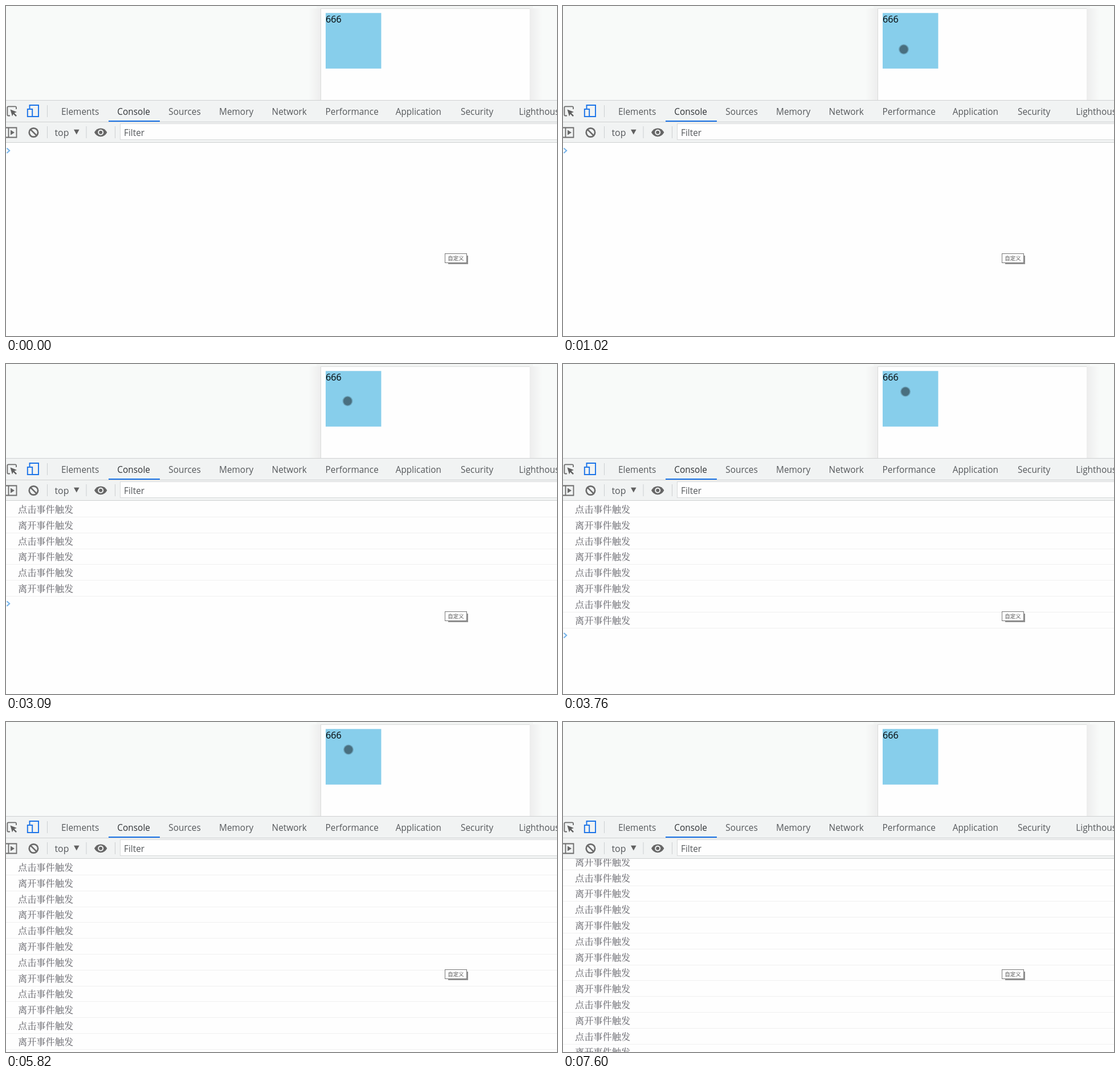
An HTML page for the animation above (8 s loop, 967x579 px).

```html
<!DOCTYPE html>
<html lang="zh">
<head>
<meta charset="utf-8">
<title>Console event log</title>
<style>
  html, body { margin: 0; width: 100%; height: 100%; overflow: hidden; background: #fefefe; }
  svg { display: block; width: 967px; height: 579px; }
  text { font: 15.4px "Open Sans", "Noto Sans", sans-serif; fill: #55585b; }
  .log text { font: 16.2px "Noto Serif CJK SC", "Noto Sans CJK SC", "Noto Sans CJK", serif; fill: #5a5a61; }
  .log path { stroke: #f0f0f0; shape-rendering: crispEdges; }
  .tip text { font: 9.5px "Noto Sans CJK SC", "Noto Sans CJK", sans-serif; fill: #555; }
  .line { fill: none; stroke: #6b6b6b; stroke-width: 1.8; }
  .sep { stroke: #cccfd1; }
</style>
</head>
<body>
<svg viewBox="0 0 967 579">
  <defs>
    <linearGradient id="shade">
      <stop offset="0" stop-color="#ededed"/>
      <stop offset="1" stop-color="#f8faf9"/>
    </linearGradient>
    <clipPath id="pane"><path d="M0 240H967V579H0Z"/></clipPath>
  </defs>

  <!-- page preview -->
  <rect width="967" height="166" fill="#f8faf9"/>
  <rect id="side" x="919" y="4" width="22" height="162" fill="url(#shade)"/>
  <use href="#side" transform="matrix(-1 0 0 1 1472 0)"/>
  <rect x="545" width="380" height="4" fill="#f3f5f4"/>
  <rect x="553" y="4" width="366" height="162" fill="#fefefe"/>
  <path d="M552.5 166V4.5H919" fill="none" stroke="#d9dbda"/>
  <rect x="561" y="12.3" width="97.5" height="97.5" fill="#87ceeb"/>
  <text x="561" y="28.8" style="font-size:16.2px;fill:#000">666</text>

  <!-- tab bar and toolbar -->
  <rect y="166" width="967" height="74" fill="#f1f3f3"/>
  <path d="M0 165.5H967M0 203.5H967M0 239.5H967" stroke="#cfd1d2"/>
  <g id="tabs"></g>
  <rect x="180" y="201" width="90" height="2" fill="#1a73e8"/>
  <path class="sep" d="M72.5 174V195M72.5 211V232M141 211V232M191.5 211V232"/>

  <path class="line" d="M7 192.5H4Q2.4 192.5 2.4 191V178Q2.4 176.4 4 176.4H16.5Q18 176.4 18 178V181"/>
  <path d="M7.5 181.5L19 186L14.5 187.8L19 192.2L17.2 194L12.8 189.5L11 193.5Z" fill="#5f5f5f"/>
  <path d="M41.5 180V174H57V194H47" fill="none" stroke="#1a73e8" stroke-width="1.9"/>
  <rect x="37.8" y="181" width="8.4" height="13" fill="none" stroke="#1a73e8" stroke-width="1.9"/>

  <path class="line" d="M-1 213.5H18.5V230.5H-1M4.5 213V231"/>
  <path d="M8 217.5L15 222L8 226.5Z" fill="#6b6b6b"/>
  <g class="line" style="stroke-width:2.7"><circle cx="48.4" cy="222" r="7.7"/><path d="M43 216.6L53.8 227.4"/></g>
  <text x="85.5" y="228" style="font-size:15.9px">top</text>
  <path d="M119 216.8H128.6L123.8 225.6Z" fill="#616161"/>
  <path d="M155 221.8Q159 214.4 166.2 214.4T177.4 221.8Q173.5 229.2 166.2 229.2T155 221.8Z" fill="#666"/>
  <circle cx="166.2" cy="221.8" r="4" fill="#666" stroke="#f1f3f3" stroke-width="2"/>
  <rect x="200.5" y="206.5" width="780" height="28" fill="#fefefe" stroke="#d7d9da"/>
  <text x="207" y="228.3">Filter</text>

  <!-- console -->
  <rect y="240" width="967" height="339" fill="#fefefe"/>
  <g clip-path="url(#pane)">
    <g id="scroller">
      <g class="log" id="log"></g>
      <path id="prompt" d="M1.5 249.5L6.2 253.7L1.5 258" fill="none" stroke="#71b1ea" stroke-width="2"/>
    </g>
  </g>

  <g class="tip">
    <path d="M776 452H810V438" fill="none" stroke="#949494" stroke-width="2"/>
    <rect x="770.5" y="434.5" width="38" height="16" fill="#fefefe" stroke="#777"/>
    <text x="775.3" y="446">自定义</text>
  </g>

  <path id="arrow" d="M.7 .7V16.5L4.3 13.1L7 19.2L9.7 18L7.1 12.1H12Z" fill="#fff" stroke="#222"/>
  <g id="touch">
    <circle r="9" fill-opacity=".2"/>
    <circle r="7.4" fill-opacity=".32"/>
  </g>
</svg>
<script>
const LOOP = 8000, ROW = 27.8, FIT = 12.68;
const $ = id => document.getElementById(id);
const NS = 'http://www.w3.org/2000/svg';

function add(parent, tag, attrs, label = '') {
  const el = document.createElementNS(NS, tag);
  for (const key in attrs) el.setAttribute(key, attrs[key]);
  el.textContent = label;
  return parent.appendChild(el);
}

const tabs = { Elements: 97, Console: 195.3, Sources: 285.3, Memory: 374, Network: 466.6,
  Performance: 560.5, Application: 683.7, Security: 798, Lighthouse: 900.3 };
for (const name in tabs) {
  const tab = add($('tabs'), 'text', { x: tabs[name], y: 190.7 }, name);
  if (name === 'Console') tab.style.fill = '#303336';
}

// moment at which each message is logged
const logTimes = [1280, 1280, 1350, 1420, 2480, 2550, 3630, 3690, 4750, 4820, 5750, 5820, 6740, 6810];
const rows = logTimes.map((_, i) => {
  const row = add($('log'), 'g', { transform: `translate(0 ${Math.round(i * ROW)})` });
  add(row, 'text', { x: 21, y: 260.5 }, (i % 2 ? '离开' : '点击') + '事件触发');
  add(row, 'path', { d: 'M0 268.5H967' });
  return row;
});

// pointer poses: time, x, y, shape
const poses = [
  [0],
  [200, 934, 565, 'arrow'], [270, 914, 524, 'arrow'], [340, 868, 420, 'arrow'],
  [410, 815, 305, 'arrow'], [480, 760, 205, 'arrow'], [550, 705, 128, 'touch'],
  [620, 662, 91.5, 'touch'], [690, 643, 87, 'touch'], [750, 628, 84.5, 'touch'],
  [820, 615, 82.5, 'touch'], [890, 606, 81.5, 'touch'], [950, 601, 81, 'touch'],
  [1020, 598, 76, 'touch'], [1080, 595.5, 71.3, 'touch'],
  [3090, 599.5, 65, 'touch'], [3160, 600.5, 59, 'touch'], [3230, 601, 54, 'touch'],
  [3300, 601, 50.5, 'touch'], [3370, 601, 48.5, 'touch'],
  [7270],
  [7480, 714, 308, 'arrow'], [7540, 837, 519, 'arrow'],
  [7600]
];

function draw(now) {
  const t = now % LOOP;
  const count = logTimes.filter(at => at <= t).length;
  rows.forEach((row, i) => row.style.display = i < count ? '' : 'none');
  $('prompt').setAttribute('transform', `translate(0 ${count * ROW})`);
  // the view stays pinned to the newest message
  const scroll = Math.round(Math.max(0, count - FIT) * ROW);
  $('scroller').setAttribute('transform', `translate(0 ${-scroll})`);

  const [, x, y, shape] = poses.filter(p => p[0] <= t).pop();
  for (const id of ['arrow', 'touch']) {
    $(id).style.display = id === shape ? '' : 'none';
    if (id === shape) $(id).setAttribute('transform', `translate(${x} ${y})`);
  }
}

const start = performance.now();
function tick() {
  draw(performance.now() - start);
  requestAnimationFrame(tick);
}
tick();
</script>
</body>
</html>
```
